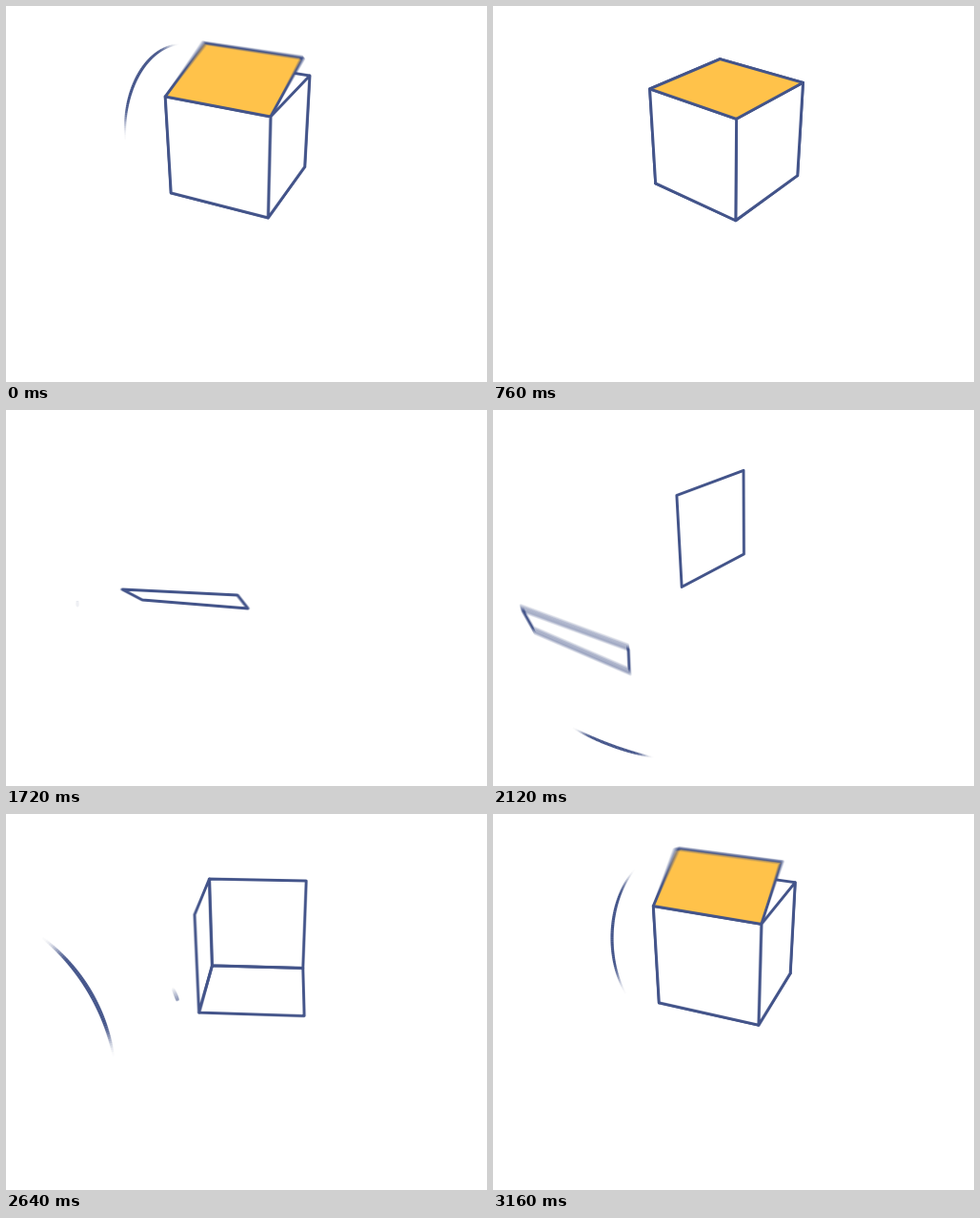
These frames come from a looping animation (505x394 px, 3200 ms). An HTML page with a canvas:

```html
<!DOCTYPE html>
<html lang="en">
<head>
<meta charset="utf-8">
<title>Box assembly</title>
<style>
html, body { margin: 0; width: 100%; height: 100%; overflow: hidden; background: #fff; }
canvas { display: block; width: 505px; height: 394px; }
</style>
</head>
<body>
<canvas id="stage" width="505" height="394"></canvas>
<script>
const W = 505, H = 394, LOOP = 3200, STEP = 40, START = 1440;
const INK = '#43548a', LID = '#ffc24a';
const SAMPLES = 9, SHUTTER = 14;
const HALF = 55, LENS = 650, TRAIL_LAG = 95, CLOSED = 3160;
const DEG = Math.PI / 180;

const out = document.getElementById('stage').getContext('2d');
const layer = document.createElement('canvas');
layer.width = W;
layer.height = H;
const g = layer.getContext('2d');

const clamp = v => Math.min(1, Math.max(0, v));
const smooth = v => { v = clamp(v); return v * v * (3 - 2 * v); };
const lerp = (a, b, k) => a + (b - a) * k;
const mix = (p, q, k) => p.map((v, i) => lerp(v, q[i], k));

// Smooth curve through rows of [time, values...]
function at(keys, t) {
  const last = keys.length - 1;
  if (t <= keys[0][0]) return keys[0].slice(1);
  if (t >= keys[last][0]) return keys[last].slice(1);
  const i = keys.findIndex(k => k[0] > t) - 1;
  const a = keys[i], b = keys[i + 1];
  const prev = keys[Math.max(0, i - 1)], next = keys[Math.min(last, i + 2)];
  const d = b[0] - a[0], u = (t - a[0]) / d, u2 = u * u, u3 = u2 * u;
  return a.slice(1).map((p, j) => {
    const n = j + 1;
    const m0 = (b[n] - prev[n]) / (b[0] - prev[0]) * d;
    const m1 = (next[n] - a[n]) / (next[0] - a[0]) * d;
    return (2 * u3 - 3 * u2 + 1) * p + (u3 - 2 * u2 + u) * m0 +
           (3 * u2 - 2 * u3) * b[n] + (u3 - u2) * m1;
  });
}

// time, yaw, pitch, zoom, centre x, centre y
const CAMERA = [
  [2120, -51, 24.5, 0.95, 270, 136],
  [2640, 3.5, 24.5, 0.965, 261, 136.5],
  [2880, 18, 31.5, 1.08, 252, 141.5],
  [CLOSED, 21.5, 27, 1, 246, 134.5]
];

// Returns a projector for points in cube units: x right, y up, z towards the viewer
function camera(t) {
  let [yaw, pitch, zoom, cx, cy] = at(CAMERA, t);
  if (t > CLOSED) yaw += 18 * (1 - Math.exp((CLOSED - t) / 230));
  const sy = Math.sin(yaw * DEG), cosY = Math.cos(yaw * DEG);
  const sp = Math.sin(pitch * DEG), cp = Math.cos(pitch * DEG);
  return ([x, y, z]) => {
    const depth = x * sy + z * cosY;
    const k = zoom * HALF * LENS / (LENS - HALF * (depth * cp + y * sp));
    return [cx + k * (x * cosY - z * sy), cy - k * (y * cp - depth * sp)];
  };
}

const wall = (...corners) => corners;
const BL = [-1, 1, -1], BR = [1, 1, -1], FR = [1, 1, 1], FL = [-1, 1, 1];
const below = ([x, , z]) => [x, -1, z];

// Each panel drifts through a pose, then docks onto its wall of the cube
const PANELS = [
  { wall: wall(BL, BR, below(BR), below(BL)), born: 1600, time: 1720, dock: 2120,
    drift: [0.15, 0], pose: [122,188, 243,194, 254,208, 143,199] },
  { wall: wall(BL, BR, FR, FL).map(below), born: 1920, time: 2120, dock: 2340,
    drift: [0.1, 0.5], pose: [30,208, 142,249, 143,274, 43,231] },
  { wall: wall(BL, FL, below(FL), below(BL)), born: 2230, time: 2320, dock: 2480,
    drift: [-0.2, -0.5], pose: [250,170, 306,190, 300,280, 245,260] },
  { wall: wall(FR, BR, below(BR), below(FR)), born: 2760, time: 2880, dock: 3040,
    drift: [0.25, -0.25], pose: [289,177, 337,195, 342,318, 312,296], solid: 2760, bends: true },
  { wall: wall(FL, FR, below(FR), below(FL)), born: 2680, time: 2880, dock: 3000,
    drift: [0.12, -0.08], pose: [151,109, 269,137, 268,247, 165,214], solid: 2900 }
];

// Strokes running along elliptical arcs; angles in degrees
const TRAILS = [
  { c: [285, 200], r: [210, 185], from: 0, to: 180, start: 1440, time: 180, w: 3 },
  { c: [150, 240], r: [147, 146], from: 60, to: 190, start: 1760, time: 170, w: 3 },
  { c: [228, 70], r: [300, 300], from: 125, to: 85, start: 1978, time: 253, w: 3.2 },
  { c: [90, 225], r: [95, 95], from: -70, to: -17.7, start: 2472, time: 80, w: 4 },
  { c: [-86, 289], r: [202, 202], from: -55, to: 5, start: 2530, time: 156, w: 4.6 },
  { c: [285, 183], r: [100, 100], from: 150, to: 87, start: 2701, time: 95, w: 2 },
  { c: [122, -123], r: [300, 300], from: 77, to: 50, start: 2785, time: 225, w: 3 },
  { c: [185, 130], r: [60, 90], from: 140, to: 275, start: 3058, time: 159, w: 3.2 }
];

function shape(p, fill, bow = 0) {
  g.beginPath();
  g.moveTo(p[0], p[1]);
  g.lineTo(p[2], p[3]);
  g.quadraticCurveTo((p[2] + p[4]) / 2 + bow * 22, (p[3] + p[5]) / 2 - bow * 24, p[4], p[5]);
  g.lineTo(p[6], p[7]);
  g.quadraticCurveTo((p[6] + p[0]) / 2 + bow * 26, (p[7] + p[1]) / 2 - bow * 14, p[0], p[1]);
  g.closePath();
  if (fill) {
    g.fillStyle = fill;
    g.fill();
  }
  g.stroke();
}

function panel({ wall, born, time, dock, drift, pose, solid, bends }, t, project) {
  if (t < born) return;
  const flown = pose.map((v, i) => v + drift[i % 2] * (t - time));
  const centre = [0, 1].map(i => (flown[i] + flown[i + 2] + flown[i + 4] + flown[i + 6]) / 4);
  const grown = flown.map((v, i) => lerp(centre[i % 2], v, smooth((t - born) / 90)));
  const p = mix(grown, wall.flatMap(project), smooth((t - time) / (dock - time)));
  const opacity = solid ? clamp((t - solid) / 100) : 0;
  const bow = bends ? Math.max(0, 1 - ((t - time) / 110) ** 2) : 0;
  shape(p, opacity ? `rgba(255,255,255,${opacity})` : null, bow);
}

// The lid unfolds from the front edge and swings back until it lies flat
function lid(t, project) {
  const open = Math.exp((CLOSED - t) / 60);
  const len = 2 * (1 - 0.37 * open), a = 36 * DEG * open;
  if (len <= 0) return;
  const free = ([x]) => [x, 1 + len * Math.sin(a), 1 - len * Math.cos(a)];
  shape([free(FL), free(FR), FR, FL].flatMap(project), LID);
}

function trail({ c, r, from, to, start, time, w }, t) {
  const head = clamp((t - start) / time), tail = clamp((t - TRAIL_LAG - start) / time);
  if (head <= tail) return;
  const point = u => {
    const a = lerp(from, to, lerp(tail, head, u)) * DEG;
    return [c[0] + r[0] * Math.cos(a), c[1] + r[1] * Math.sin(a)];
  };
  const n = 28;
  g.save();
  g.lineCap = 'butt';
  for (let i = 0; i < n; i++) {
    const s = Math.sin(Math.PI * (i + 0.5) / n);
    g.globalAlpha = Math.min(1, 2.2 * s);
    g.lineWidth = w * Math.pow(s, 0.3);
    g.beginPath();
    g.moveTo(...point(i / n));
    g.lineTo(...point((i + 1) / n));
    g.stroke();
  }
  g.restore();
}

function scene(t) {
  const project = camera(t);
  g.fillStyle = '#fff';
  g.fillRect(0, 0, W, H);
  g.strokeStyle = INK;
  g.lineWidth = 2.9;
  g.lineJoin = g.lineCap = 'round';
  PANELS.forEach(p => panel(p, t, project));
  lid(t, project);
  TRAILS.forEach(tr => trail(tr, t));
  // Veil the finished box in white until it is gone
  g.fillStyle = `rgba(255,255,255,${smooth((t - 3960) / 270)})`;
  g.fillRect(0, 0, W, H);
}

function frame(now) {
  let t = Math.floor((now % LOOP) / STEP) * STEP;
  if (t < START) t += LOOP;
  // Average several moments for motion blur
  for (let i = 0; i < SAMPLES; i++) {
    scene(t + (i / (SAMPLES - 1) - 0.5) * SHUTTER);
    out.globalAlpha = 1 / (i + 1);
    out.drawImage(layer, 0, 0);
  }
}

let origin = null;
function tick(now) {
  if (origin === null) origin = now;
  frame(Math.max(0, now - origin));
  requestAnimationFrame(tick);
}
frame(0);
requestAnimationFrame(tick);
</script>
</body>
</html>
```
